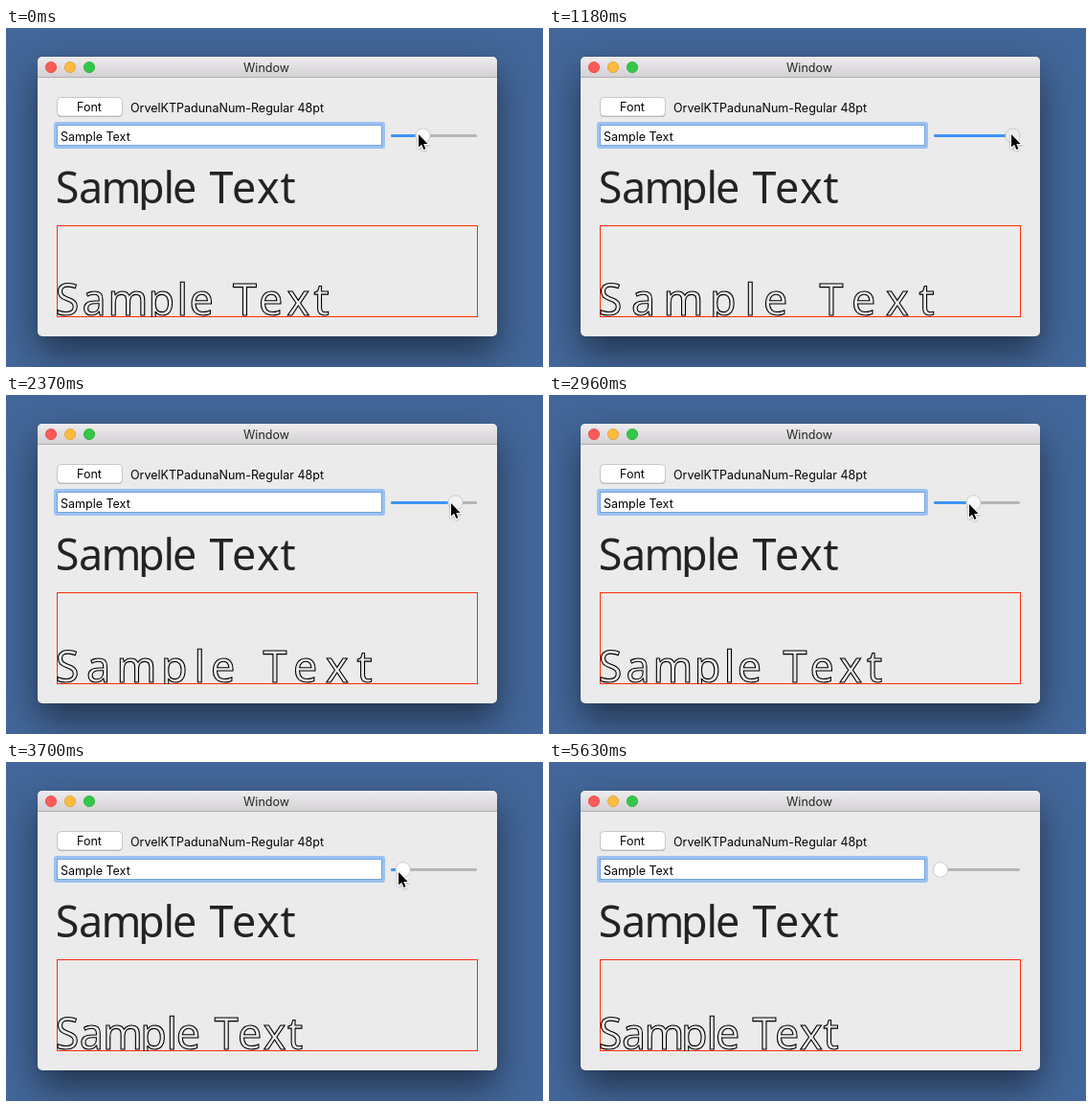
Recreate the animation shown at these times as an HTML page. Size 561 by 354 pixels, loop 5.78 s.

```html
<!DOCTYPE html>
<html lang="en">
<head>
<meta charset="utf-8">
<title>Letter spacing</title>
<style>
  html, body { margin: 0; width: 100%; height: 100%; overflow: hidden; background: #43679a; }
  .win {
    position: absolute; left: 33px; top: 30px; width: 480px; height: 292px; border-radius: 5px;
    box-shadow: 0 0 1px rgba(0,0,0,.4), 0 17px 37px rgba(0,0,0,.5);
  }
  svg { position: absolute; left: 0; top: 0; width: 561px; height: 354px; }
  .ui { font: 12.5px Inter, Roboto, sans-serif; fill: #050505; }
  .big { font: 44.8px "Noto Sans", "Open Sans", sans-serif; }
</style>
</head>
<body>
<div class="win"></div>
<svg viewBox="0 0 561 354">
  <defs>
    <linearGradient id="bar" x2="0" y2="1">
      <stop stop-color="#eeecee"/><stop offset="1" stop-color="#d2d0d2"/>
    </linearGradient>
    <clipPath id="frame"><rect x="33" y="30" width="480" height="292" rx="5"/></clipPath>
    <clipPath id="labelBox"><rect x="50" y="140" width="443" height="50"/></clipPath>
    <clipPath id="pathBox"><rect x="53" y="206" width="440" height="96"/></clipPath>
    <filter id="soft" x="-50%" y="-50%" width="200%" height="200%">
      <feDropShadow dx="0" dy="1" stdDeviation="1" flood-opacity=".3"/>
    </filter>
  </defs>

  <g clip-path="url(#frame)">
    <rect x="33" y="30" width="480" height="292" fill="#ebebeb"/>
    <rect x="33" y="30" width="480" height="22" fill="url(#bar)"/>
    <rect x="33" y="51" width="480" height="1" fill="#b4b2b4"/>
  </g>
  <g stroke-width=".8">
    <circle cx="47" cy="41" r="5.6" fill="#fc5b57" stroke="#e2443f"/>
    <circle cx="67" cy="41" r="5.6" fill="#fdbb3f" stroke="#dfa033"/>
    <circle cx="87" cy="41" r="5.6" fill="#34c748" stroke="#27aa35"/>
  </g>

  <rect x="53.5" y="73" width="68" height="20" rx="4" fill="#b0b0b0"/>
  <rect x="53.5" y="72.5" width="68" height="19.5" rx="4" fill="#fff" stroke="#c6c6c6"/>

  <rect x="50" y="98" width="346" height="28" rx="3" fill="#9cc1f1"/>
  <rect x="53.5" y="101.5" width="339" height="21" fill="#fff" stroke="#75a5de"/>

  <g class="ui">
    <text x="272" y="46" text-anchor="middle" style="fill:#262626">Window</text>
    <text x="87" y="87" text-anchor="middle">Font</text>
    <text x="130" y="88">OrvelKTPadunaNum-Regular 48pt</text>
    <text x="57" y="118">Sample Text</text>
  </g>
  <rect id="caret" x="130" y="104" width="1" height="17"/>

  <rect x="402" y="111" width="90" height="3" rx="1.5" fill="#b5b5b5"/>
  <rect id="fill" x="402" y="111" height="3" rx="1.5" fill="#3f95f4"/>
  <circle id="knob" cy="112.5" r="7.7" stroke="#bcbcbc" stroke-width=".7"/>

  <g class="big">
    <g clip-path="url(#labelBox)"><text id="label" y="183" fill="#232323">Sample Text</text></g>
    <rect x="53.5" y="206.5" width="439" height="95" fill="none" stroke="#ff2b0a"/>
    <g clip-path="url(#pathBox)">
      <text id="outline" y="300" fill="none" stroke="#000" stroke-width="1.1">Sample Text</text>
    </g>
  </g>

  <path id="cursor" d="M0 0V13.6L3.1 10.7L5.4 15.9L7.4 15L5.2 9.9H9.6Z"
        stroke="#fff" stroke-width="2" paint-order="stroke" filter="url(#soft)"/>
</svg>
<script>
  const LOOP = 5780, STEPS = 39;
  const MIN = 409, MAX = 484.5, RELEASE = 29, GONE = 32;
  // glyph origins with no extra spacing
  const GLYPHS = [51.8, 76, 99.4, 138, 164.5, 174, 198, 212.5, 236, 262, 286.4];
  // pointer path: step, x, y
  const POINTER = [
    [0, 431, 111], [4, 459, 111], [8, 483, 111], [10, 489, 111], [12, 489, 111],
    [16, 465, 113], [20, 439, 114], [23, 419, 115], [28, 397, 115], [30, 397, 115], [31, 402, 33]
  ];
  const $ = id => document.getElementById(id);
  const set = (id, attrs) => {
    for (const key in attrs) $(id).setAttribute(key, attrs[key]);
  };
  const spread = gap => GLYPHS.map((x, i) => (x + i * gap).toFixed(2)).join(' ');

  function pointerAt(step) {
    const i = POINTER.findIndex(p => p[0] >= step);
    if (i < 0) return POINTER[POINTER.length - 1].slice(1);
    if (i === 0) return POINTER[0].slice(1);
    const a = POINTER[i - 1], b = POINTER[i];
    const k = (step - a[0]) / (b[0] - a[0]);
    return [a[1] + (b[1] - a[1]) * k, a[2] + (b[2] - a[2]) * k];
  }

  function draw(ms) {
    const step = Math.floor((ms % LOOP) / LOOP * STEPS + 0.1) % STEPS;
    const [px, py] = pointerAt(step);
    const knob = step < RELEASE ? Math.min(MAX, Math.max(MIN, px + 4.5)) : MIN;
    const value = (knob - MIN) / (MAX - MIN);
    const shade = Math.round(255 - 18 * value);
    const caretOn = step === RELEASE || (step >= 34 && step < 38);

    set('knob', { cx: knob, fill: `rgb(${shade},${shade},${shade})` });
    set('fill', { width: knob - 402, visibility: value > 0 ? 'visible' : 'hidden' });
    set('outline', { x: spread(value * 10) });
    set('caret', { visibility: caretOn ? 'visible' : 'hidden' });
    set('cursor', {
      transform: `translate(${px} ${py})`,
      visibility: step < GONE ? 'visible' : 'hidden'
    });
  }

  set('label', { x: spread(0) });
  const start = performance.now();
  function tick() {
    draw(performance.now() - start);
    requestAnimationFrame(tick);
  }
  tick();
</script>
</body>
</html>
```
